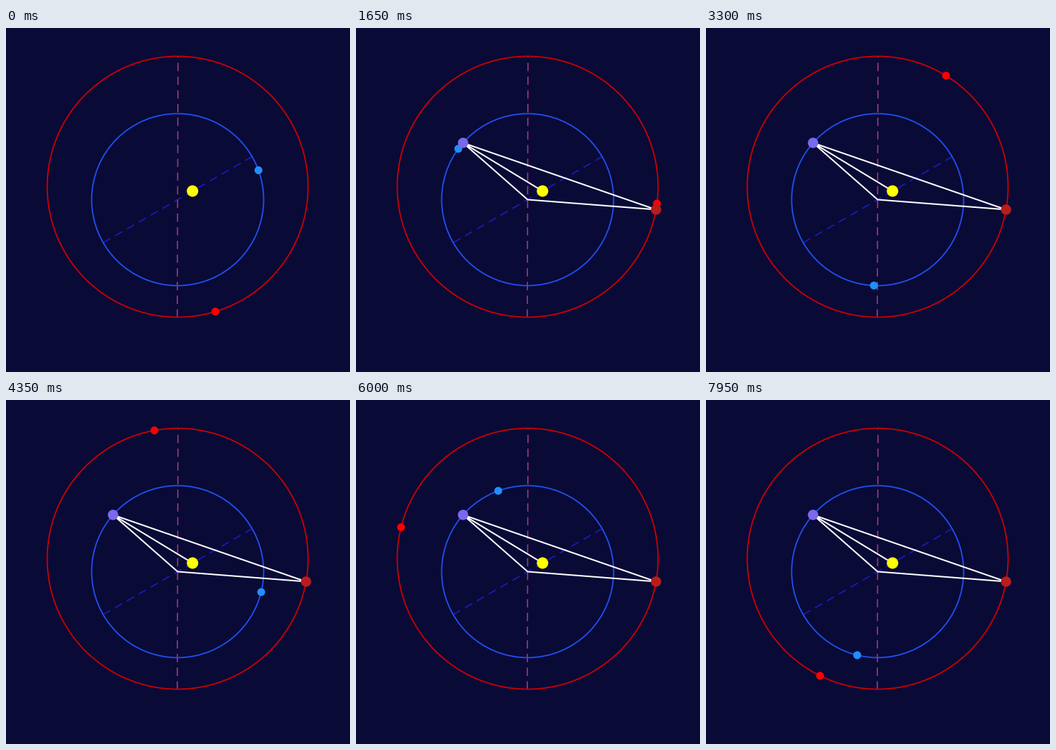
Animation of 480x480 px, one loop 8000 ms. Source, as a matplotlib script:

```python
import numpy as np
import matplotlib.pyplot as plt
from matplotlib.animation import FuncAnimation
from matplotlib.patches import Circle

SIZE = 480
DPI = 72  # one point equals one pixel
INTERVAL = 50
FRAMES = 160
FRAMES_PER_STEP = 3

EARTH_CENTER, EARTH_RADIUS = np.array([239.5, 239.5]), 120
MARS_CENTER, MARS_RADIUS = np.array([239.5, 221.5]), 182
EARTH_START, EARTH_RATE = 20.0, 11.25
MARS_START, MARS_RATE = -73.2, 11.25 * 365.25 / 687
SIGHT_STEP = 10.55  # moment of the fixed observation

fig = plt.figure(figsize=(SIZE / DPI, SIZE / DPI), dpi=DPI, facecolor="#0a0a37")
ax = fig.add_axes([0, 0, 1, 1])
ax.set_xlim(0, SIZE)
ax.set_ylim(SIZE, 0)
ax.axis("off")


def on_circle(center, radius, degrees):
    a = np.radians(degrees)
    return center + radius * np.array([np.cos(a), -np.sin(a)])


def earth_at(step):
    return on_circle(EARTH_CENTER, EARTH_RADIUS, EARTH_START + EARTH_RATE * step)


def mars_at(step):
    return on_circle(MARS_CENTER, MARS_RADIUS, MARS_START + MARS_RATE * step)


def dot(center, radius, color, z):
    return ax.add_patch(Circle(center, radius, fc=color, lw=0, zorder=z))


def orbit(center, radius, color):
    ax.add_patch(Circle(center, radius, fill=False, ec=color, lw=1.8, zorder=2))


def line(points, color, width, z, **style):
    xs, ys = zip(*points)
    return ax.plot(xs, ys, color=color, lw=width, zorder=z, **style)[0]


def apsides(center, radius, degrees, color):
    ends = [on_circle(center, radius, degrees + turn) for turn in (180, 0)]
    line(ends, color, 1.6, 1, dashes=(11.5 / 1.6, 7.6 / 1.6), dash_capstyle="butt")


apsides(EARTH_CENTER, EARTH_RADIUS, 30, "#1c1cc0")
orbit(MARS_CENTER, MARS_RADIUS, "#cc0000")
orbit(EARTH_CENTER, EARTH_RADIUS, "#1e50f0")
apsides(MARS_CENTER, MARS_RADIUS, 90, "#a03c78")

sun_pos = on_circle(EARTH_CENTER, 0.2 * EARTH_RADIUS, 30)
dot(sun_pos, 8, "#ffff00", 6)

earth_mark, mars_mark = earth_at(SIGHT_STEP), mars_at(SIGHT_STEP)
sight = [
    line([sun_pos, earth_mark, EARTH_CENTER, mars_mark, earth_mark], "white", 2, 3,
         solid_joinstyle="round"),
    dot(earth_mark, 7.2, "#7b68ee", 5),
    dot(mars_mark, 7.2, "#b81c1c", 5),
]
earth = dot(earth_at(0), 5.5, "#1e90ff", 4)
mars = dot(mars_at(0), 5.5, "#ff0000", 4)


def update(frame):
    step = frame // FRAMES_PER_STEP
    earth.center = earth_at(step)
    mars.center = mars_at(step)
    for artist in sight:
        artist.set_visible(step >= SIGHT_STEP)
    return [earth, mars, *sight]


anim = FuncAnimation(fig, update, frames=FRAMES, interval=INTERVAL,
                     init_func=lambda: update(0), repeat=True, repeat_delay=0)
plt.show()
```
